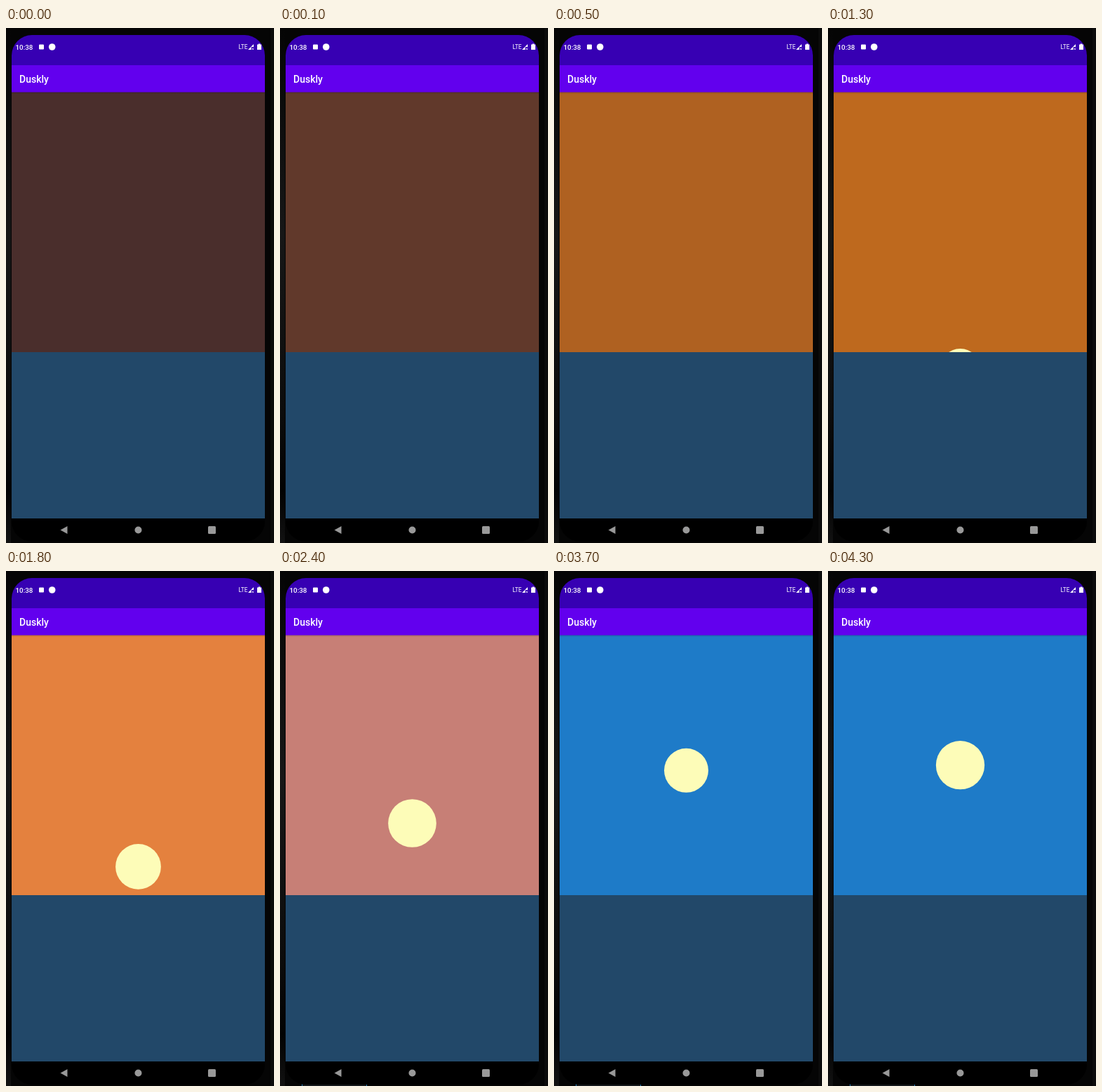
An HTML page that plays this animation: 382 by 734 pixels, repeating every 4400 ms.

```html
<!DOCTYPE html>
<html lang="en">
<head>
<meta charset="utf-8">
<style>
  html, body { margin: 0; width: 100%; height: 100%; overflow: hidden; background: #050505; }
  svg { display: block; width: 382px; height: 734px; }
  text { font-family: Roboto, sans-serif; fill: #fff; }
</style>
</head>
<body>
<svg viewBox="0 0 382 734">
  <defs>
    <clipPath id="screen"><rect x="8" y="10" width="361" height="722" rx="29"/></clipPath>
    <linearGradient id="bezel" x2="0" y2="1">
      <stop offset="0" stop-color="#050505"/>
      <stop offset=".4" stop-color="#171717"/>
      <stop offset=".75" stop-color="#0c0c0c"/>
      <stop offset=".9" stop-color="#020202"/>
      <stop offset="1" stop-color="#121212"/>
    </linearGradient>
    <linearGradient id="shadow" x2="0" y2="1">
      <stop offset="0" stop-opacity=".22"/>
      <stop offset="1" stop-opacity="0"/>
    </linearGradient>
  </defs>

  <rect width="382" height="734" fill="#050505"/>
  <rect width="7" height="734" fill="url(#bezel)"/>
  <rect x="377" width="5" height="734" fill="#0b0b0b"/>
  <rect id="hint" x="31.5" y="728.5" width="92" height="10" fill="#15191c" stroke="#2580bd"/>

  <g clip-path="url(#screen)">
    <rect x="8" y="10" width="361" height="722"/>
    <rect id="sky" x="8" y="91" width="361" height="371"/>
    <circle id="sun" cx="188.5" fill="#fdfcb8"/>
    <rect x="8" y="462" width="361" height="237" fill="#224869"/>
    <rect x="8" y="91" width="361" height="3" fill="url(#shadow)"/>
    <rect x="8" y="10" width="361" height="43" fill="#3700b3"/>
    <rect x="8" y="53" width="361" height="38.5" fill="#6200ee"/>
  </g>

  <text x="19" y="78" font-size="14" font-weight="500">Duskly</text>
  <text x="13.5" y="30.7" font-size="9.8" font-weight="500">10:38</text>
  <text x="331.5" y="30.4" font-size="8.3">LTE</text>
  <g fill="#fff">
    <rect x="47" y="23.5" width="7" height="7" rx="1"/>
    <circle cx="65.7" cy="27" r="4.8"/>
    <path d="M345 31 353 23V27H349.500V31Z"/>
    <path d="M350.500 28.500 353 31M353 28.500 350.500 31" stroke="#fff" stroke-width=".8"/>
    <path d="M358 23.500H359.700V22.500H362.300V23.500H364V31H358Z"/>
  </g>
  <g fill="#999">
    <path d="M77.500 715.500 87.500 710V721Z"/>
    <circle cx="188.500" cy="715.500" r="5"/>
    <rect x="288" y="710" width="11" height="11" rx="1.500"/>
  </g>
</svg>
<script>
const LOOP = 4400, STEP = 100;
const DAWN = { start: -268, length: 1500 };
const RISE = { start: 1265, length: 3000 };
const PULSE_START = 1240;
const NIGHT = [5, 25, 46], ORANGE = [236, 129, 0], BLUE = [30, 123, 200];

const [sky, sun, hint] = ['sky', 'sun', 'hint'].map(id => document.getElementById(id));
const clamp = x => Math.min(1, Math.max(0, x));
const ease = x => (1 - Math.cos(Math.PI * x)) / 2;
const progress = (t, phase) => clamp((t - phase.start) / phase.length);

// Colours blend in linear light.
const blend = (from, to, k) => `rgb(${from.map((c, i) =>
  Math.round((c ** 2.2 * (1 - k) + to[i] ** 2.2 * k) ** (1 / 2.2)))})`;

// The sky pauses on some shades and then jumps.
function skyTime(t) {
  if (t < 1400) return Math.min(t, 600);
  if (t < 1800) return 1800;
  return t < 3700 ? Math.min(t, 3100) : LOOP;
}

function draw(t) {
  const s = skyTime(t);
  sky.setAttribute('fill', s < RISE.start
    ? blend(NIGHT, ORANGE, ease(progress(s, DAWN)))
    : blend(ORANGE, BLUE, ease(progress(s, RISE))));

  const rest = 1 - progress(t, RISE);
  sun.setAttribute('cy', 276.7 + 214.3 * rest ** 2);
  sun.setAttribute('r', 29 + 5.7 * ease(Math.max(0, t - PULSE_START) / 1000));
  hint.setAttribute('visibility', t < 2400 ? 'hidden' : 'visible');
}

const begin = performance.now();
function tick() {
  const t = (performance.now() - begin) % LOOP;
  draw(Math.floor(t / STEP) * STEP);
  requestAnimationFrame(tick);
}
tick();
</script>
</body>
</html>
```
